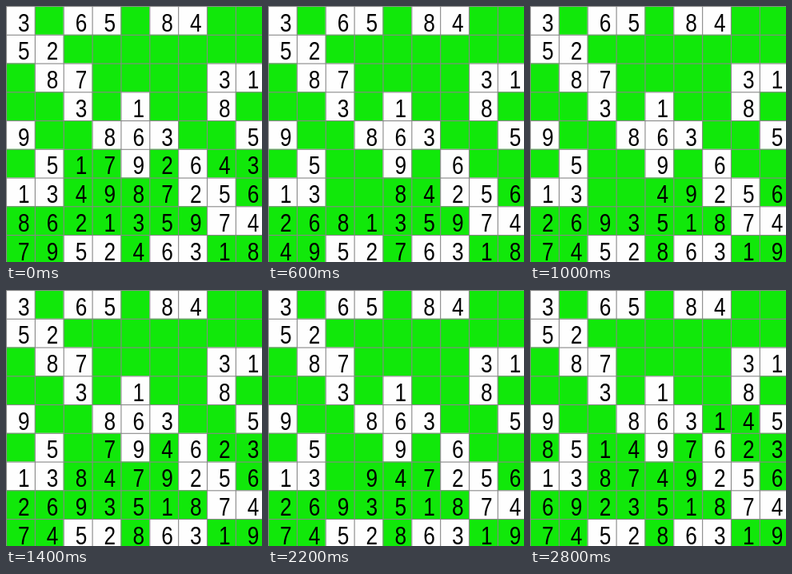
Write an HTML page that moves like this. It is 320 px wide and 320 px high and loops after 3000 ms.

```html
<!DOCTYPE html>
<html lang="en">
<head>
<meta charset="utf-8">
<title>Sudoku backtracking</title>
<style>
html, body { margin: 0; width: 100%; height: 100%; overflow: hidden; background: #fff; }
svg { display: block; width: 100vw; height: 100vh; }
text { font: 30.5px "Liberation Sans", Arial, sans-serif; text-anchor: middle; fill: #000; }
.given { fill: #fefefe; }
.open { fill: #11e80a; }
.line { fill: #888; }
</style>
</head>
<body>
<svg id="board" viewBox="0 0 320 320"></svg>
<script>
const GIVENS = [
  '3.65.84..', '52.......', '.87....31',
  '..3.1..8.', '9..863..5', '.5..9.6..',
  '13....25.', '.......74', '..52.63..'
].join('');
// The search is already under way when the loop begins.
const OPENING = GIVENS.slice(0, 45) + '.51792643' + '134987256' + '862135974' + '795246318';
const DIGITS = '819234567';
const CELL_W = 35.85, CELL_H = 35.75, LINE = 1.1;
const CONDENSED = 0.86;
const STEP_MS = 200, STEPS = 15, PLACEMENTS_PER_STEP = 20;

const svg = document.getElementById('board');
function add(tag, attrs) {
  const el = document.createElementNS('http://www.w3.org/2000/svg', tag);
  for (const key in attrs) el.setAttribute(key, attrs[key]);
  return svg.appendChild(el);
}

const rowOf = i => Math.floor(i / 9);
const boxOf = i => Math.floor(i / 27) * 3 + Math.floor(i % 9 / 3);
const left = i => i % 9 * CELL_W;
const top_ = i => rowOf(i) * CELL_H;

function allowed(grid, cell, digit) {
  return grid.every((value, i) => value !== digit || i === cell ||
    (rowOf(i) !== rowOf(cell) && i % 9 !== cell % 9 && boxOf(i) !== boxOf(cell)));
}

// Backtracks from the last cell to the first, keeping every 20th placement.
function search() {
  const grid = [...OPENING];
  const cells = [...grid.keys()].filter(i => GIVENS[i] === '.').reverse();
  const states = [grid.slice()];
  let pos = cells.findIndex(i => grid[i] === '.');
  let placed = 0;
  while (states.length < STEPS && pos >= 0 && pos < cells.length) {
    const cell = cells[pos];
    const start = DIGITS.indexOf(grid[cell]) + 1;
    const digit = [...DIGITS.slice(start)].find(d => allowed(grid, cell, d));
    grid[cell] = digit || '.';
    if (!digit) { pos--; continue; }
    pos++;
    if (++placed % PLACEMENTS_PER_STEP === 0) states.push(grid.slice());
  }
  return states;
}

[...GIVENS].forEach((value, i) => add('rect', {
  x: left(i), y: top_(i), width: CELL_W + 1, height: CELL_H + 1,
  class: value === '.' ? 'open' : 'given'
}));
for (let i = 0; i < 9; i++) {
  add('rect', { x: i * CELL_W, y: 0, width: LINE, height: 320, class: 'line' });
  add('rect', { x: 0, y: i * CELL_H, width: 320, height: LINE, class: 'line' });
}
const labels = [...GIVENS].map((_, i) => add('text', {
  transform: `translate(${left(i) + 22.3} ${top_(i) + 31.6}) scale(${CONDENSED} 1)`
}));

const states = search();
let shown = -1;
function draw(elapsed) {
  const step = Math.floor(elapsed / STEP_MS) % STEPS;
  if (step === shown) return;
  shown = step;
  states[step].forEach((value, i) => { labels[i].textContent = value === '.' ? '' : value; });
}

const origin = performance.now();
function loop() {
  draw(performance.now() - origin);
  requestAnimationFrame(loop);
}
loop();
</script>
</body>
</html>
```
